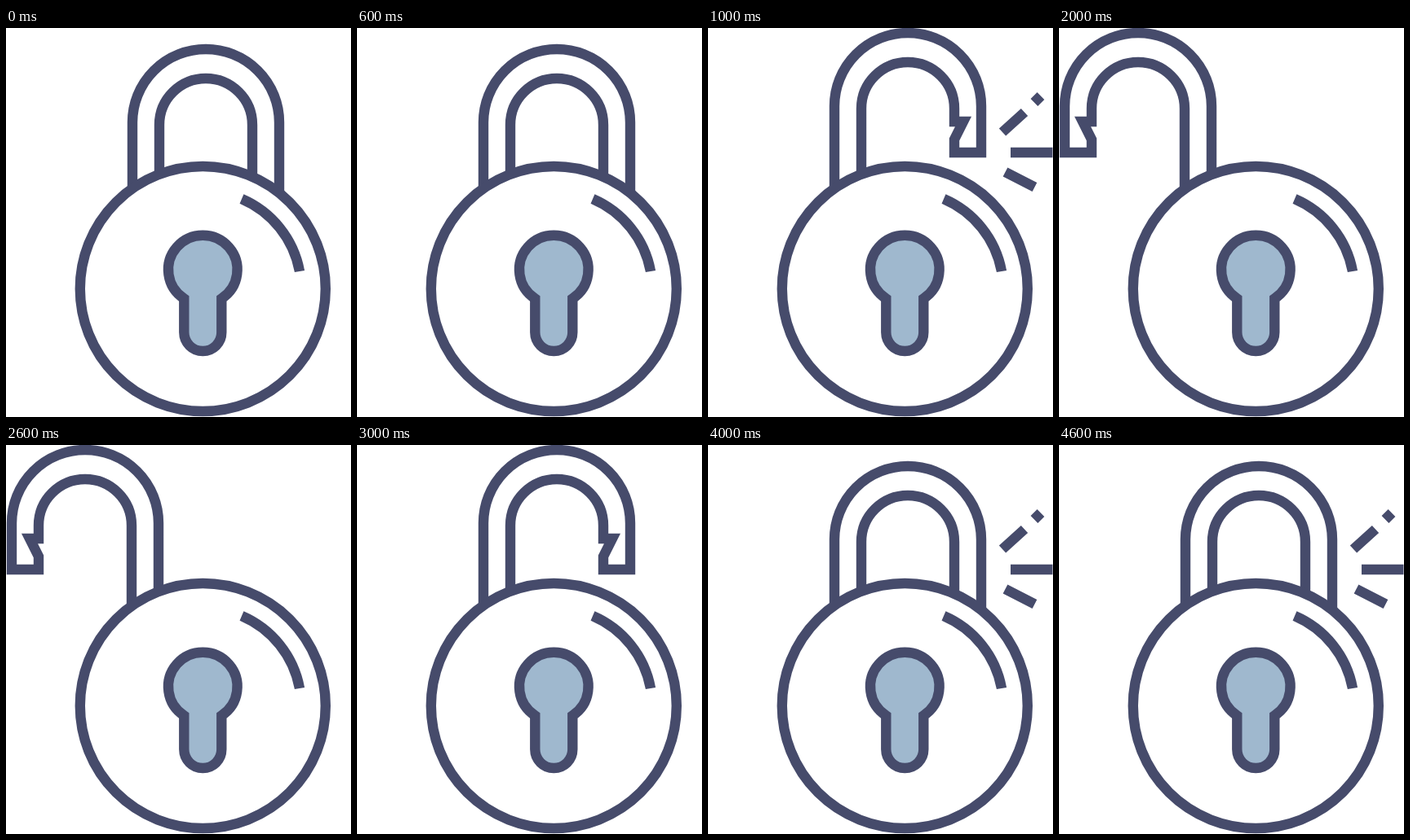
Write an HTML page that moves like this. It is 423 by 478 pixels and loops after 5 s.

```html
<!DOCTYPE html>
<html lang="en">
<head>
<meta charset="utf-8">
<title>Padlock</title>
<style>
  html, body { margin: 0; width: 100%; height: 100%; overflow: hidden; background: #fff; }
  svg { display: block; width: 423px; height: 478px; }
  .line { fill: none; stroke: #464b6b; stroke-width: 12.4; stroke-miterlimit: 6; }
</style>
</head>
<body>
<svg viewBox="0 0 423 478">
  <g class="line">
    <g id="closed">
      <path d="M155 215V116a90 90 0 0 1 180 0V215"/>
      <path d="M188 195V119a57 57 0 0 1 114 0V195"/>
    </g>
    <path id="open" d="M155 215V96a90 90 0 0 1 180 0V153H302V137L313 115H302V99a57 57 0 0 0-114 0V195"/>
    <path id="sparks" d="M361 128L388 103.5M400 91.5L408 83.5M371 153H422.5M364.5 177L400.5 195.5"/>
    <circle cx="241.3" cy="320.5" r="150.5" fill="#fff"/>
    <path d="M289 210A120.5 120.5 0 0 1 360 299"/>
    <path fill="#9fb8ce" d="M218.3 332.5A42.3 42.3 0 1 1 264.3 332.5V374a23 23 0 0 1-46 0Z"/>
  </g>
</svg>
<script>
  const STEP = 1000;
  const poses = [
    { open: false, flip: false, sparks: false },
    { open: true,  flip: false, sparks: true },
    { open: true,  flip: true,  sparks: false },
    { open: true,  flip: false, sparks: false },
    { open: false, flip: false, sparks: true }
  ];
  const part = id => document.getElementById(id);
  const closed = part('closed'), open = part('open'), sparks = part('sparks');
  const show = (el, on) => el.setAttribute('visibility', on ? 'visible' : 'hidden');

  function draw() {
    const pose = poses[Math.floor(performance.now() / STEP) % poses.length];
    show(closed, !pose.open);
    show(open, pose.open);
    show(sparks, pose.sparks);
    // The open shackle swings over by mirroring about its left leg.
    open.setAttribute('transform', pose.flip ? 'matrix(-1 0 0 1 342 0)' : '');
    requestAnimationFrame(draw);
  }
  draw();
</script>
</body>
</html>
```
